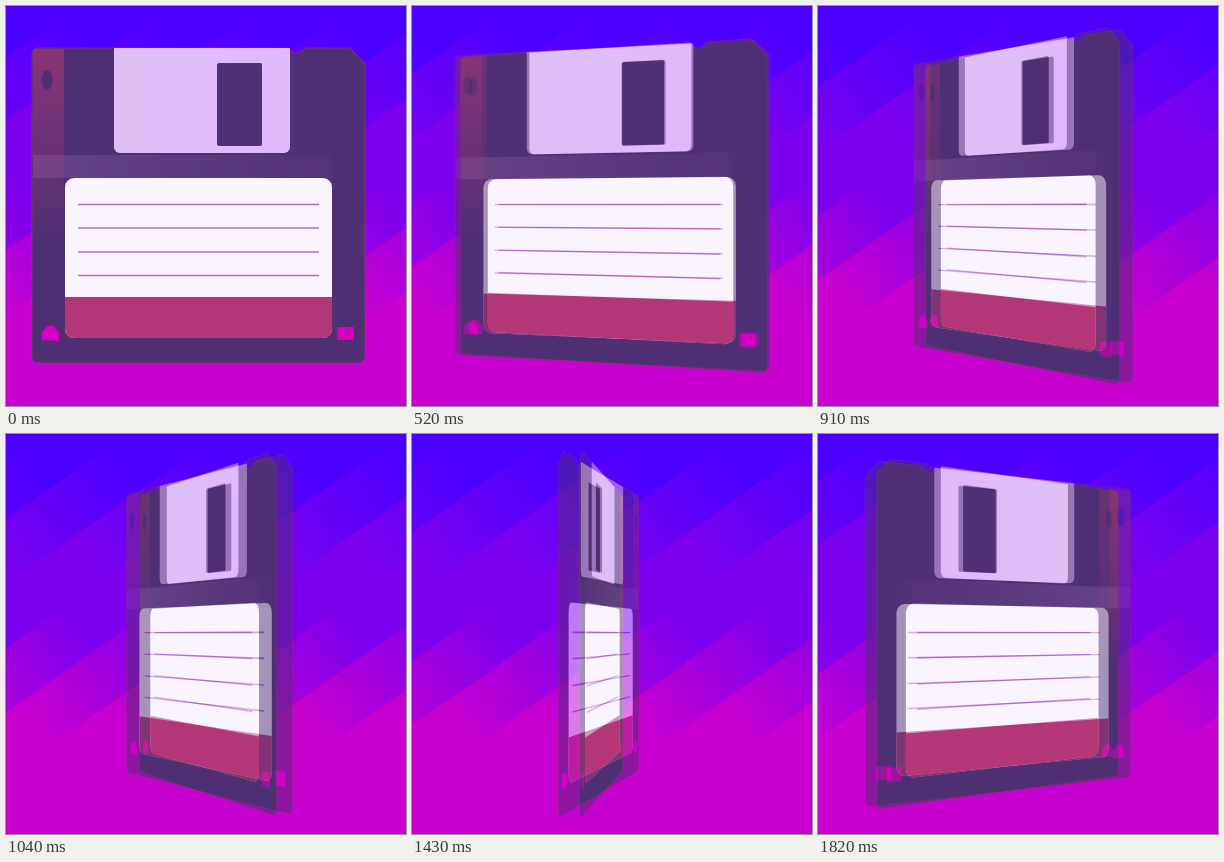
An HTML page with a canvas for the animation above (1950 ms loop, 400 px wide and 400 px high).

```html
<!DOCTYPE html>
<html lang="en">
<head>
<meta charset="utf-8">
<title>Spinning floppy disk</title>
<style>
  html, body { margin: 0; width: 100%; height: 100%; overflow: hidden; background: #4b00ff; }
  canvas { display: block; width: 400px; height: 400px; }
</style>
</head>
<body>
<canvas id="stage" width="400" height="400"></canvas>
<script>
const SIZE = 400, STEP = 130;
// Turn of the disk in degrees at each step.
const TURN = [0, 2.5, 8, 15, 23.5, 33.5, 44, 55, 66.3, 78.5, 91, 103.7, 116.5, 129.3, 142.2];
const CX = 192.5, CY = 199.7, DEPTH = 1085;
// Each picture is an even mix of two poses, half a step apart.
const POSES = 2, LAG = 0.5;

const BODY = 'rgb(80,48,115)', HOLE = 'rgb(214,0,192)';
const BLUE = [75, 0, 255], VIOLET = [124, 0, 237], MAGENTA = [200, 0, 208];

const ctx = document.getElementById('stage').getContext('2d');
const layer = () => {
  const c = document.createElement('canvas');
  c.width = c.height = SIZE;
  return c.getContext('2d');
};
const disk = layer(), mixed = layer();
const sky = ctx.createImageData(SIZE, SIZE);

const clamp = v => Math.max(0, Math.min(1, v));

// Vertical ramp broken up by slanted stripes that move one period per loop.
function drawSky(progress) {
  const period = 92, height = 45, slope = 0.7;
  const shift = period * progress - 38;
  const px = sky.data;
  let i = 0;
  for (let y = 0; y < SIZE; y++) {
    const start = (y - 270) / slope - shift;
    for (let x = 0; x < SIZE; x++) {
      const u = (x + start) / period;
      const v = y + height * (0.5 - (u - Math.floor(u)));
      const low = v > 160;
      const from = low ? VIOLET : BLUE, to = low ? MAGENTA : VIOLET;
      const k = low ? clamp((v - 195) / 95) : clamp((v - 30) / 95);
      for (let c = 0; c < 3; c++) px[i++] = from[c] + (to[c] - from[c]) * k;
      px[i++] = 255;
    }
  }
  ctx.putImageData(sky, 0, 0);
}

function turnAt(step) {
  if (step <= 0) return 0;
  const i = Math.min(Math.floor(step), TURN.length - 2);
  return (TURN[i] + (TURN[i + 1] - TURN[i]) * (step - i)) * Math.PI / 180;
}

function projector(angle) {
  const cos = Math.cos(angle), sin = Math.sin(angle);
  return (x, y) => {
    const scale = DEPTH / (DEPTH - (x - CX) * sin);
    return [CX + (x - CX) * cos * scale, CY + (y - CY) * scale];
  };
}

// Rectangle outline; radii run from top left, clockwise.
function box(x0, y0, x1, y1, radii = [0, 0, 0, 0]) {
  const corners = [[x0, y0, 1, 1], [x1, y0, -1, 1], [x1, y1, -1, -1], [x0, y1, 1, -1]];
  return corners.flatMap(([x, y, sx, sy], n) => {
    const r = radii[n];
    if (!r) return [[x, y]];
    return [0, 1, 2, 3, 4].map(j => {
      const a = Math.PI * (1 + n / 2 + j / 8);
      return [x + sx * r + r * Math.cos(a), y + sy * r + r * Math.sin(a)];
    });
  });
}

function oval(x, y, rx, ry) {
  return Array.from({ length: 16 }, (_, n) => {
    const a = n * Math.PI / 8;
    return [x + rx * Math.cos(a), y + ry * Math.sin(a)];
  });
}

const OUTLINE = [[26, 46], [30, 42], [283, 42], [286, 47], [292, 47], [300, 42], [344, 42],
  [359, 57], [359, 353], [355, 357], [30, 357], [26, 353]];
const LEFT_HOLE = [[36, 334], [36, 326], [41, 320], [48, 320], [53, 327], [53, 335]];
const LABEL = box(59, 172, 326, 332, [9, 9, 9, 9]);
const BAND = box(59, 291, 326, 332, [0, 0, 9, 9]);
const PLATE = box(108, 42, 284, 147, [0, 0, 6, 6]);

function drawDisk(angle) {
  const g = disk, at = projector(angle);
  const trace = points => {
    g.beginPath();
    points.forEach(p => g.lineTo(...at(...p)));
    g.closePath();
  };
  const fill = (points, paint) => {
    trace(points);
    g.fillStyle = paint;
    g.fill();
  };
  const fade = (x0, y0, x1, y1, from, to) => {
    const a = at(x0, y0), b = at(x1, y1);
    const upright = x0 === x1;
    const paint = g.createLinearGradient(a[0], upright ? a[1] : 0, b[0], upright ? b[1] : 0);
    paint.addColorStop(0, from);
    paint.addColorStop(1, to);
    return paint;
  };

  g.clearRect(0, 0, SIZE, SIZE);
  fill(OUTLINE, BODY);
  fill(box(27, 149, 326, 172), fade(27, 160, 326, 160, 'rgba(205,165,235,.16)', 'rgba(205,165,235,.02)'));
  fill(box(27, 43, 58, 230), fade(42, 42, 42, 230, 'rgba(190,56,122,.5)', 'rgba(190,56,122,0)'));
  trace(OUTLINE);
  g.strokeStyle = 'rgba(180,52,120,.5)';
  g.lineWidth = 1;
  g.stroke();

  fill(box(58, 43, 108, 149), BODY);
  fill(oval(41, 74, 5.5, 10), BODY);
  fill(PLATE, fade(108, 95, 284, 95, 'rgb(221,192,244)', 'rgb(225,183,253)'));
  fill(box(211, 57, 256, 140, [2, 2, 2, 2]), BODY);

  fill(LABEL, 'rgb(250,243,255)');
  fill(BAND, 'rgb(178,53,120)');
  for (const y of [198.5, 222, 246, 269.5]) fill(box(72, y - 0.7, 313, y + 0.7), 'rgb(170,105,215)');

  fill(LEFT_HOLE, HOLE);
  fill(box(331.5, 321, 348, 334), HOLE);
}

function render(step) {
  drawSky(step / TURN.length);
  mixed.clearRect(0, 0, SIZE, SIZE);
  mixed.globalCompositeOperation = 'lighter';
  mixed.globalAlpha = 1 / POSES;
  for (let n = 0; n < POSES; n++) {
    drawDisk(turnAt(step - LAG * n));
    mixed.drawImage(disk.canvas, 0, 0);
  }
  ctx.drawImage(mixed.canvas, 0, 0);
}

let shown = -1;
const begin = performance.now();
function tick() {
  const step = Math.floor((performance.now() - begin) / STEP) % TURN.length;
  if (step !== shown) render(shown = step);
  requestAnimationFrame(tick);
}
tick();
</script>
</body>
</html>
```
